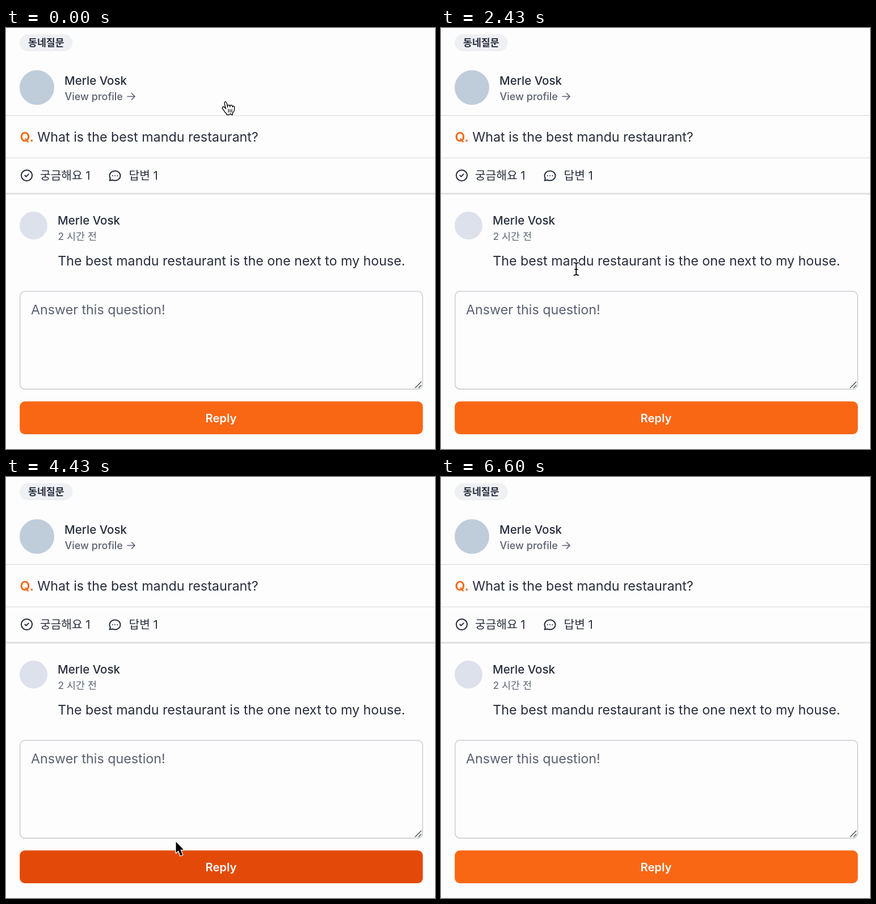
An HTML page that plays this animation: 756 by 741 pixels, repeating every 6.71 s.

```html
<!DOCTYPE html>
<html lang="ko">
<head>
<meta charset="utf-8">
<title>Question page</title>
<style>
  html, body { margin: 0; height: 100%; overflow: hidden; background: #fdfdfd; }
  svg { display: block; width: 100vw; height: 100vh; }
  text { font-family: Inter, "Noto Sans CJK KR", "Noto Sans CJK", sans-serif; fill: #272d3d; white-space: pre; }
  .body { font-size: 23.25px; }
  .name { font-size: 20.5px; font-weight: 500; }
  .stat { font-size: 20.3px; }
  .muted { fill: #5a6172; }
  .icon { fill: none; stroke: #272d3d; stroke-width: 1.9; stroke-linecap: round; stroke-linejoin: round; }
  .rule { fill: #e0e1e5; }
  #cursor > g { display: none; stroke-linejoin: round; }
</style>
</head>
<body>
<svg viewBox="0 0 756 741">
  <rect x="24" y="11" width="93.5" height="30" rx="15" fill="#eff0f4"/>
  <text x="39" y="32" font-size="17.3" font-weight="600">동네질문</text>

  <circle cx="54.5" cy="104.7" r="30.5" fill="#bfccda"/>
  <text class="name" x="103" y="100">Merle Vosk</text>
  <text class="muted" x="103.5" y="126.7" font-size="18" font-weight="500">View profile</text>
  <path d="M214 120.5H227M221.5 115L227 120.5L221.5 126" fill="none" stroke="#5a6172" stroke-width="1.7" stroke-linecap="round" stroke-linejoin="round"/>
  <rect class="rule" y="153.3" width="756" height="1.5"/>

  <text class="body" x="24.5" y="200" font-weight="600" style="fill:#ec6a17">Q.</text>
  <text class="body" x="55.3" y="200">What is the best mandu restaurant?</text>
  <rect class="rule" y="227.8" width="756" height="1.5"/>

  <path class="icon" transform="translate(23.8 246.8) scale(1.06)" d="M9 12l2 2 4-4m6 2a9 9 0 11-18 0 9 9 0 0118 0z"/>
  <text class="stat" x="60" y="266.8">궁금해요 1</text>
  <path class="icon" transform="translate(179.3 247.3) scale(1.06)" d="M8 12h.01M12 12h.01M16 12h.01M21 12c0 4.418-4.03 8-9 8a9.863 9.863 0 01-4.255-.949L3 20l1.395-3.72C3.512 15.042 3 13.574 3 12c0-4.418 4.03-8 9-8s9 3.582 9 8z"/>
  <text class="stat" x="216.5" y="266.8">답변 1</text>
  <rect class="rule" y="290.2" width="756" height="3"/>

  <circle cx="48.5" cy="347.7" r="24.5" fill="#dde1ec"/>
  <text class="name" x="91" y="346">Merle Vosk</text>
  <text class="muted" x="91.5" y="372.5" font-size="17.4">2 시간 전</text>
  <text class="body" x="91.2" y="417.5">The best mandu restaurant is the one next to my house.</text>

  <rect x="25" y="465" width="709.5" height="172.3" rx="9" fill="#eeeff1"/>
  <rect id="field" x="24.75" y="463.5" width="709.5" height="172" rx="8.5" fill="#fdfdfd" stroke="#c9ccd2" stroke-width="1.5"/>
  <rect id="ring" x="24.3" y="463.3" width="710.6" height="172.6" rx="9" fill="none" stroke="#f8661a" stroke-width="3"/>
  <text class="body muted" x="44" y="504">Answer this question!</text>
  <path d="M721 633.5L732 622.5M727 633.5L732 628.5" stroke="#474a50" stroke-width="1.4"/>

  <rect id="button" x="24.2" y="657.3" width="710.4" height="57.7" rx="9"/>
  <text x="351.5" y="693.8" font-size="20.2" font-weight="600" style="fill:#fff">Reply</text>

  <g id="cursor">
    <g id="hand" transform="scale(1.5) translate(-12 -7.6)" fill="#fff" stroke="#000" stroke-width=".9" stroke-linecap="round">
      <path d="M11.3 20.4c-.3-.4-.6-1.1-1.2-2-.3-.5-1.2-1.5-1.5-1.9-.2-.4-.2-.6-.1-1 .1-.6.7-1.1 1.4-1.1.5 0 1 .4 1.4.7.2.2.5.6.7.8l.6.8-.6-2.2-.6-2.4-.3-1.5c-.1-.5-.1-1.4.3-1.8.3-.3.9-.4 1.3-.2.5.3.8 1 .9 1.3.2.5.4 1.2.5 2l.5 2.8v-1.5c.1-.3.3-.7.7-.8.3-.1.6-.1.9-.1.3.1.6.3.8.5.4.6.4 1.9.4 1.8.1-.4.1-1.2.3-1.6.1-.2.5-.4.7-.5.3-.1.7-.1 1 0 .2 0 .6.3.7.5.2.3.3 1.3.4 1.7 0 .1.1-.4.3-.7.4-.6 1.8-.8 1.9.6v2.3c0 .4-.1 1.3-.2 1.7-.1.3-.4 1-.7 1.4 0 0-1.1 1.2-1.2 1.8-.1.6-.1 1.4 0 1.9 0 0-.8.1-1.2 0-.4-.1-.9-.8-1-1.1-.2-.3-.5-.3-.7 0-.2.4-.7 1.1-1.1 1.1-.7.1-2.1 0-3.1 0 0 0 .2-1-.2-1.4l-1.1-1.1z"/>
      <path d="M15.6 17.3v3.4M17.6 17.3v3.4M19.6 17.3v3.4" stroke-width=".8"/>
    </g>
    <g id="beam" fill="none" stroke-linecap="round">
      <path d="M-4-11Q0-11 0-8V8Q0 11-4 11M4-11Q0-11 0-8M0 8Q0 11 4 11M-2.2.8H2.2" stroke="#fff" stroke-width="4"/>
      <path d="M-4-11Q0-11 0-8V8Q0 11-4 11M4-11Q0-11 0-8M0 8Q0 11 4 11M-2.2.8H2.2" stroke="#111" stroke-width="1.9"/>
    </g>
    <g id="arrow">
      <path d="M0 0V19.5L4.3 15.4L8 24.4L11.6 22.9L7.9 14H13.4Z" stroke="#fff" stroke-width="2.6"/>
      <path d="M0 0V19.5L4.3 15.4L8 24.4L11.6 22.9L7.9 14H13.4Z"/>
    </g>
  </g>
</svg>
<script>
const LOOP = 6710, GONE = 5360;
const el = id => document.getElementById(id);

// Pointer hotspot: [time, x, y]
const path = [
  [0, 386.5, 128.5], [700, 140, 108], [930, 126.5, 106.5], [1350, 150, 128],
  [1730, 237, 274], [2130, 239, 300], [2600, 238, 476], [3270, 237, 478],
  [3490, 285, 670], [3900, 302, 702], [4260, 299, 703], [4430, 299.5, 642],
  [4680, 335, 616], [5030, 347.5, 622], [5260, 352, 691], [GONE, 356, 770],
];

const within = (v, a, b) => v >= a && v < b;

function pointerAt(t) {
  const i = Math.max(1, path.findIndex(p => p[0] > t));
  const [t0, x0, y0] = path[i - 1], [t1, x1, y1] = path[i];
  const k = (t - t0) / (t1 - t0), e = k * k * (3 - 2 * k);
  return [x0 + (x1 - x0) * e, y0 + (y1 - y0) * e];
}

function shapeAt(y) {
  if (within(y, 60, 154) || within(y, 657, 715)) return 'hand';
  const text = [[176, 208], [246, 278], [395, 425], [463, 636]];
  return text.some(([a, b]) => within(y, a, b)) ? 'beam' : 'arrow';
}

function draw(now) {
  const t = now % LOOP, visible = t < GONE;
  const hover = within(t, 3540, 4460) || within(t, 5240, GONE);
  el('button').setAttribute('fill', hover ? '#e34a09' : '#f96715');
  el('ring').style.display = within(t, 2660, 3490) ? '' : 'none';
  el('cursor').style.display = visible ? '' : 'none';
  if (visible) {
    const [x, y] = pointerAt(t), shape = shapeAt(y);
    el('cursor').setAttribute('transform', `translate(${x} ${y})`);
    for (const id of ['hand', 'beam', 'arrow']) el(id).style.display = id === shape ? 'inline' : 'none';
  }
  requestAnimationFrame(() => draw(performance.now() - start));
}

const start = performance.now();
draw(0);
</script>
</body>
</html>
```
